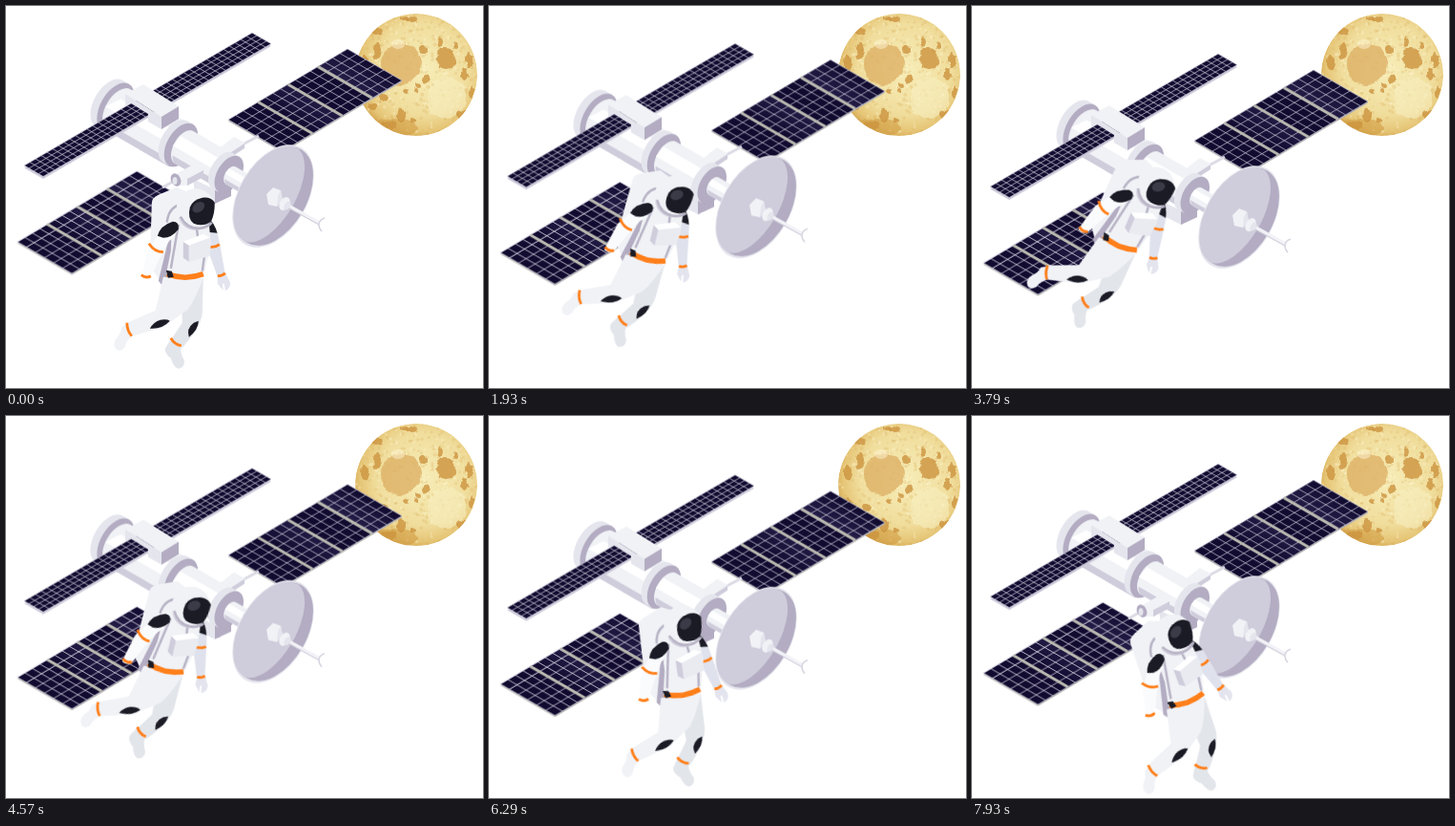
An HTML page that plays this animation: 500 px wide and 400 px high, repeating every 8 s.

```html
<!DOCTYPE html>
<html lang="en">
<head>
<meta charset="utf-8">
<title>Astronaut and satellite</title>
<style>
  html, body { margin: 0; height: 100%; overflow: hidden; background: #fff; }
  svg { display: block; width: 100vw; height: 100vh; }
  #station { animation: bob 8s linear infinite; }
  #astronaut { transform-origin: 251.5px 184.5px; animation: swing 8s linear infinite; }
  @keyframes bob {
    0% { transform: translateY(0); }
    75.7% { transform: translateY(35.3px); }
    100% { transform: translateY(21.7px); }
  }
  @keyframes swing {
    0% { transform: rotate(0deg); }
    44.6% { transform: rotate(25.7deg); }
    88.1% { transform: rotate(-17.8deg); }
    100% { transform: rotate(-20.2deg); }
  }
  .white { fill: #f0f2f6; }
  .pale { fill: #e4e5ed; }
  .mid { fill: #cfccdb; }
  .shade { fill: #b3acc2; }
  .dark { fill: #1b1b26; }
  .cell { fill: none; stroke: #d5d4e2; stroke-width: .7; vector-effect: non-scaling-stroke; }
  .beam { fill: none; stroke: #b9b8b0; stroke-width: 3; vector-effect: non-scaling-stroke; }
  .stripe { fill: none; stroke: #ff7f1a; stroke-width: 2.8; }
  .tube { fill: none; stroke: #b9b4c6; stroke-width: 2.5; }
</style>
</head>
<body>
<svg viewBox="0 0 500 400">
  <defs>
    <radialGradient id="moonFill" cx=".55" cy=".45" r=".58">
      <stop offset="0" stop-color="#f7edb8"/>
      <stop offset=".65" stop-color="#f0dd9c"/>
      <stop offset=".88" stop-color="#e6c677"/>
      <stop offset="1" stop-color="#d6a955"/>
    </radialGradient>
    <linearGradient id="sheen">
      <stop offset="0" stop-color="#120b30"/>
      <stop offset=".55" stop-color="#2b2450"/>
      <stop offset="1" stop-color="#120b30"/>
    </linearGradient>
    <clipPath id="moonClip"><circle cx="430" cy="72" r="64"/></clipPath>
    <filter id="ragged">
      <feTurbulence type="fractalNoise" baseFrequency=".12" numOctaves="2" seed="4"/>
      <feDisplacementMap in="SourceGraphic" scale="7" xChannelSelector="R" yChannelSelector="G"/>
    </filter>
    <g id="panel">
      <path d="M0 0H125V57H0Z" fill="#b5b4b0" transform="translate(-1.3 1.3)"/>
      <path d="M0 0H125V57H0Z" fill="#120b30"/>
      <path d="M32 0H62V57H32ZM95 0H125V57H95Z" fill="url(#sheen)"/>
      <path id="panelGrid" class="cell"/>
      <path class="beam" d="M31.3 0V57M62.6 0V57M93.9 0V57"/>
    </g>
  </defs>

  <g id="moon" clip-path="url(#moonClip)">
    <circle cx="430" cy="72" r="64" fill="url(#moonFill)"/>
    <g id="specks"></g>
    <g id="craters" filter="url(#ragged)"></g>
    <ellipse cx="411" cy="40" rx="7" ry="5" fill="#fff8d8" opacity=".5"/>
  </g>

  <g id="station">
    <use href="#panel" transform="matrix(1 -.592 1 .579 12 247)"/>
    <use href="#panel" transform="matrix(1 -.592 1 .579 233 119)"/>

    <path d="M164 190L180 181M246 146L265 136" fill="none" stroke="#dcdbe5" stroke-width="3"/>
    <path class="white" d="M222 150L239 137L250 143L250 148L236 157Z"/>
    <path class="mid" d="M236 153L250 144V149L236 158Z"/>

    <!-- hull parts lie along the rotated x axis -->
    <g transform="translate(115 106) rotate(30)">
      <path class="pale" d="M-8 -28H0V28H-8A16 28 0 0 1 -8 -28Z"/>
      <ellipse class="shade" rx="16" ry="28"/>
      <path class="white" d="M4 -24H80V25H4A14 24.5 0 0 1 4 -24Z"/>
      <path fill="#fff" d="M0 -10H80V5H-10Z"/>
      <path class="mid" d="M-1 19H80V26H4Q1 24 -1 19Z"/>
      <path class="pale" d="M72 -25H79V25H72A14.5 25 0 0 1 72 -25Z"/>
      <ellipse class="shade" cx="79" rx="14.5" ry="25"/>
      <path class="white" d="M83 -19H138V20H83A11 19.5 0 0 1 83 -19Z"/>
      <path fill="#fff" d="M74 -8H138V5H72Z"/>
      <path class="mid" d="M77 14H138V20H83Q79 19 77 14Z"/>
    </g>

    <path class="pale" d="M196 181L219 192V207L198 196Z"/>
    <path class="shade" d="M219 192L236 183V199L219 207Z"/>
    <g transform="translate(115 106) rotate(30)">
      <path class="pale" d="M130 -20H138V23H130A12 21.5 0 0 1 130 -20Z"/>
      <ellipse class="shade" cx="138" cy="1.5" rx="12.5" ry="21.5"/>
      <path class="white" d="M140 -9H172V12H140A6 10.5 0 0 1 140 -9Z"/>
      <path fill="#fff" d="M135 -4H172V3H134Z"/>
      <path class="mid" d="M136 8H172V12H140Z"/>
    </g>

    <path class="white" d="M180 175L196 166L207 172V179L190 188L178 188Z"/>
    <path class="mid" d="M190 181L207 172V179L190 188Z"/>
    <ellipse class="shade" cx="178" cy="182" rx="5" ry="7" transform="rotate(-25 178 182)"/>
    <ellipse class="pale" cx="177" cy="183" rx="2.5" ry="4"/>

    <g transform="matrix(1 -.5816 1 .579 19 167)">
      <path class="mid" d="M0 0H239V20H0Z" transform="translate(-2.1 2.1)"/>
      <path d="M0 0H239V20H0Z" fill="#120b30"/>
      <path id="boomGrid" class="cell"/>
    </g>
    <path class="pale" d="M125 92L163 116V129L149 121V113L131 102L125 104Z"/>
    <path class="white" d="M125 92L144 82L181 105L163 116Z"/>
    <path class="shade" d="M163 116L181 105V118L163 129Z"/>

    <g transform="translate(280 199) rotate(30)">
      <ellipse class="pale" rx="36" ry="58.5"/>
      <ellipse class="shade" cx="1" cy="-.5" rx="34" ry="56.5"/>
      <path class="mid" d="M-2 -56A33 56 0 0 0 -2 56A27 56 0 0 0 23 0A27 56 0 0 0 -2 -56Z"/>
    </g>
    <path d="M290 206L328 227" stroke="#f2f2f7" stroke-width="4"/>
    <path d="M290 208L328 229" stroke="#c8c5d4" stroke-width="1"/>
    <path d="M334 222Q328 224 328 229Q328 233 331 236" fill="none" stroke="#d5d3de" stroke-width="1.4"/>
    <path class="white" d="M273 197L280 190L288 193L290 203L284 210L275 208Z"/>
    <path class="pale" d="M284 210L290 203L288 193L285 199Z"/>
    <ellipse class="white" cx="292" cy="207" rx="5" ry="7.5" transform="rotate(30 292 207)"/>
    <ellipse class="pale" cx="295" cy="209" rx="3" ry="5" transform="rotate(30 295 209)"/>
  </g>

  <g id="astronaut"><g transform="translate(.8 .7)">
    <path class="white" d="M152 206Q152 200 159 197L178 189L194 196L188 265L164 291L150 272Z"/>
    <path class="shade" d="M169 246L181 238L177 268L163 292L159 287Z"/>
    <path class="tube" d="M168 226Q169 211 182 207"/>

    <path class="dark" d="M210 220Q218 226 221 238L211 240Z"/>
    <path fill="#dfe2ec" d="M210 236L221 237L224 252L229 280L221 283L212 258Z"/>
    <path fill="#e3e4ee" d="M221 281L229 279L234 288Q235 294 230 297L226 296L221 290Z"/>
    <path d="M227 290L228 297" stroke="#fff" stroke-width="2"/>
    <path class="stripe" d="M211 251Q218 253 223 249M221 282Q226 282 229 279"/>

    <path fill="#e2e5ea" d="M182 288L206 284L205 320Q204 335 184 357L172 349L184 331L183 310Z"/>
    <path fill="#e2e5ea" d="M172 348L183 356Q181 362 186 370Q187 378 180 379Q175 378 172 368Q166 364 166 358Z"/>
    <path class="dark" d="M201 329Q201 338 191 346Q188 337 196 331Z"/>
    <path class="stripe" d="M172 347Q176 354 183 355"/>

    <path class="white" d="M164 283L206 284Q199 304 190 317Q174 328 166 335L131 345L126 331L156 318Z"/>
    <path class="white" d="M126 332L131 345Q125 350 124 356Q120 362 115 359Q110 354 115 347Q120 342 120 336Z"/>
    <path class="dark" d="M150 337Q154 330 161 328Q168 327 171 329Q163 338 150 337Z"/>
    <path class="stripe" d="M126 331Q126 339 131 345"/>

    <path class="white" d="M173 227Q188 220 212 226L214 250L206 283Q186 290 167 280L172 256Z"/>
    <path class="tube" d="M199 232L201 246M207 262L205 277M180 228L172 274"/>
    <path d="M168 280Q187 287 206 280" fill="none" stroke="#ff7f1a" stroke-width="5.5"/>
    <path class="dark" d="M167 276L173 277L175 283L169 284Z"/>

    <path class="mid" d="M185 246L191 250V267L185 263Z"/>
    <path fill="#fff" d="M185 246L206 238L213 242L191 250Z"/>
    <path fill="#e9ebf1" d="M191 250L213 242V261L191 267Z"/>

    <path fill="#fafbfd" d="M166 228L178 228Q181 237 171 244L164 256L151 283Q147 287 141 284L143 274L148 254Z"/>
    <path class="dark" d="M158 240Q161 229 174 225Q181 225 180 233Q173 242 164 242Z"/>
    <path class="stripe" d="M149 248Q155 257 164 257M141 281Q146 285 151 282"/>

    <ellipse class="mid" cx="198" cy="217" rx="18" ry="17"/>
    <ellipse class="white" cx="198" cy="211" rx="20" ry="20.5"/>
    <path class="tube" d="M182 220Q189 233 203 232Q211 231 215 226"/>
    <path class="dark" d="M192 210Q195 202 205 200Q214 199 218 205Q218 218 214 225Q206 231 196 227Q189 222 192 210Z"/>
    <ellipse cx="201" cy="210" rx="7" ry="5" fill="#3b3b48" transform="rotate(-35 201 210)"/>
  </g></g>
</svg>
<script>
  const byId = id => document.getElementById(id);

  function grid(width, height, columns, rows) {
    let d = "";
    for (let i = 0; i <= columns; i++) d += `M${i * width / columns} 0V${height}`;
    for (let j = 0; j <= rows; j++) d += `M0 ${j * height / rows}H${width}`;
    return d;
  }
  byId("panelGrid").setAttribute("d", grid(125, 57, 16, 6));
  byId("boomGrid").setAttribute("d", grid(239, 20, 40, 4));

  function spot(parent, cx, cy, rx, ry, fill, opacity) {
    const node = document.createElementNS("http://www.w3.org/2000/svg", "ellipse");
    for (const [key, value] of Object.entries({ cx, cy, rx, ry, fill, opacity })) node.setAttribute(key, value);
    byId(parent).append(node);
  }

  let seed = 7;
  const random = () => (seed = seed * 16807 % 2147483647) / 2147483647;
  for (let i = 0; i < 420; i++) {
    const angle = random() * Math.PI * 2, reach = 64 * Math.sqrt(random()), size = .5 + random() * 1.5;
    spot("specks", 430 + reach * Math.cos(angle), 72 + reach * Math.sin(angle),
      size, size, random() < .5 ? "#fdf8d6" : "#d9b365", .3);
  }

  spot("craters", 400, 128, 32, 10, "#cf993f", .55);
  spot("craters", 414, 61, 21, 22, "#dcae62", .75);
  spot("craters", 462, 96, 20, 22, "#f8f0c4", .55);
  [[461, 55, 10, 11], [440, 76, 5, 5], [389, 47, 5, 8], [376, 59, 4, 8], [388, 26, 7, 4],
   [437, 46, 4, 4], [425, 14, 7, 3], [418, 13, 4, 2], [455, 37, 3, 5], [471, 42, 3, 4],
   [480, 71, 4, 7], [486, 57, 4, 9], [430, 88, 2, 3], [420, 90, 3, 3], [395, 97, 4, 4],
   [385, 105, 5, 4], [414, 115, 4, 7], [426, 120, 3, 3], [400, 125, 10, 4], [479, 114, 8, 5],
   [488, 91, 2, 6], [432, 83, 2, 2], [377, 92, 4, 6]
  ].forEach(crater => spot("craters", ...crater, "#cc9340", .8));
</script>
</body>
</html>
```
